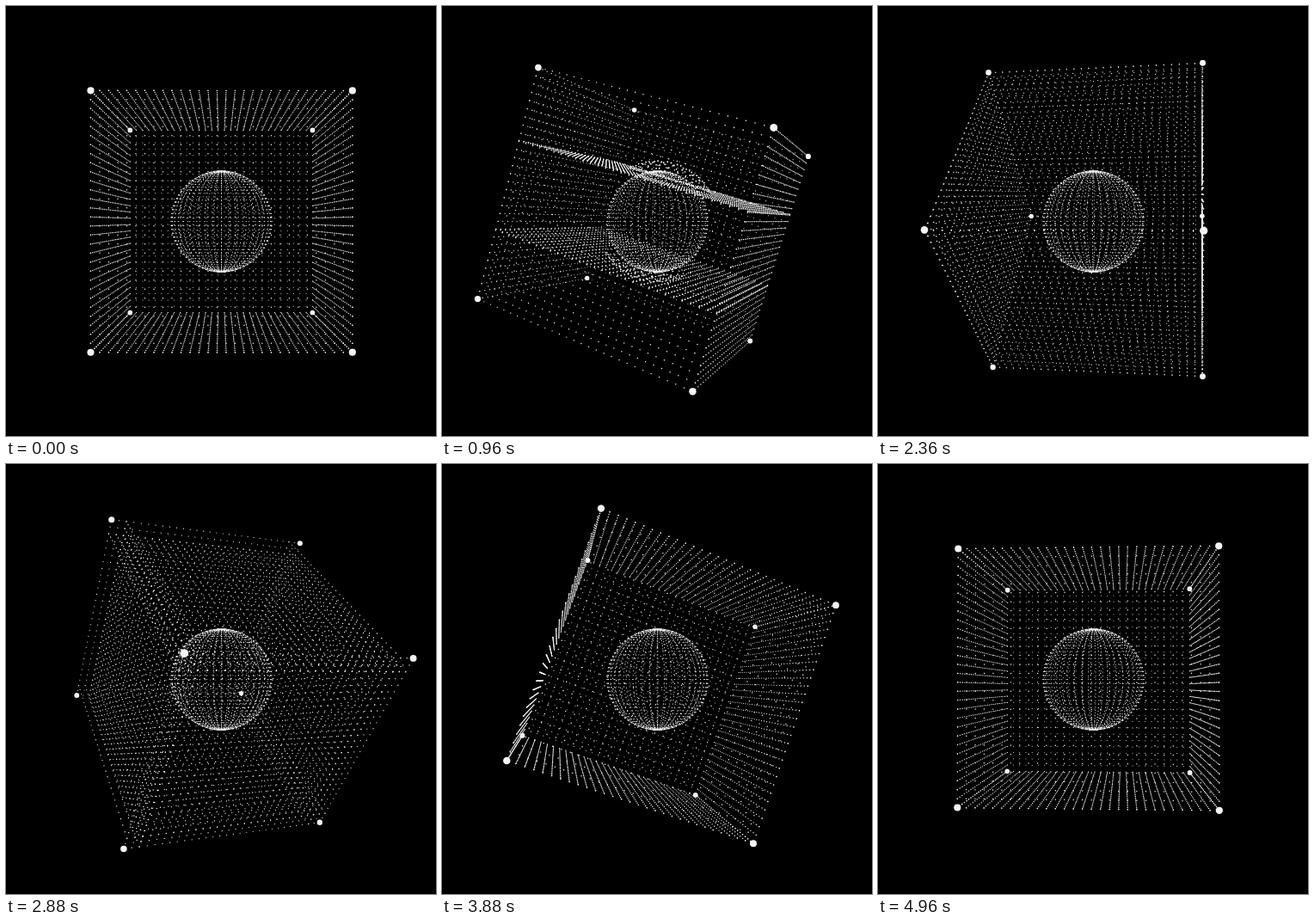
An HTML page with a canvas for the animation above (5 s loop, 500 by 500 pixels).

```html
<!DOCTYPE html>
<html lang="en">
<head>
<meta charset="utf-8">
<title>Dotted cube and sphere</title>
<style>
  html, body { margin: 0; width: 100%; height: 100%; overflow: hidden; background: #000; }
  canvas { display: block; width: 500px; height: 500px; }
</style>
</head>
<body>
<canvas id="stage" width="500" height="500"></canvas>
<script>
const ctx = document.getElementById("stage").getContext("2d");
const TAU = Math.PI * 2;
const LOOP = 5000;
const CENTER = 250.5;
const CAMERA = 700;
const HALF = 125;
const GRID = 30;
const SPHERE = 58.5;
const BUBBLE = 70;
const MERIDIANS = 40;
const PARALLELS = 40;

// Axes whose pair of faces swaps sides in each third of the loop.
const MOVING_AXES = [[1], [0, 2], [0, 1, 2]];

const clamp = (v, lo, hi) => Math.min(hi, Math.max(lo, v));
const easeInOut = p => p < 0.5 ? 4 * p ** 3 : 1 - 4 * (1 - p) ** 3;

const spherePoints = [];
for (let i = 1; i < PARALLELS; i++) {
  const lat = Math.PI * i / PARALLELS;
  for (let j = 0; j < MERIDIANS; j++) {
    const lon = TAU * j / MERIDIANS;
    spherePoints.push([
      SPHERE * Math.sin(lat) * Math.sin(lon),
      SPHERE * Math.cos(lat),
      SPHERE * Math.sin(lat) * Math.cos(lon)
    ]);
  }
}

const gridPos = i => HALF * (2 * i / (GRID - 1) - 1);

function rotateX([x, y, z], angle) {
  const c = Math.cos(angle), s = Math.sin(angle);
  return [x, y * c + z * s, z * c - y * s];
}

function rotateY([x, y, z], angle) {
  const c = Math.cos(angle), s = Math.sin(angle);
  return [x * c + z * s, y, z * c - x * s];
}

function dot([x, y, z], diameter) {
  const scale = CAMERA / (CAMERA - z);
  ctx.beginPath();
  ctx.arc(CENTER + x * scale, CENTER + y * scale, diameter * scale / 2, 0, TAU);
  ctx.fill();
}

// Dots inside the bubble are pushed out onto its surface; dots of faces on the move grow.
function drawFace(axis, offset, place) {
  const restSize = 1.2 + 0.45 * (1 - Math.abs(offset) / HALF);
  for (let i = 0; i < GRID; i++) {
    for (let j = 0; j < GRID; j++) {
      const point = [0, 0, 0];
      point[axis] = offset;
      point[(axis + 1) % 3] = gridPos(i);
      point[(axis + 2) % 3] = gridPos(j);
      const push = Math.max(1, BUBBLE / Math.hypot(...point));
      dot(place(point.map(v => v * push)), restSize + Math.min(0.5, push - 1));
    }
  }
}

function draw(t) {
  const spin = TAU * t;
  const tilt = TAU * t / 4;
  const place = p => rotateY(rotateX(p, tilt), spin);

  ctx.fillStyle = "#000";
  ctx.fillRect(0, 0, 500, 500);
  ctx.fillStyle = "#f5f5f5";

  for (const p of spherePoints) dot(rotateY(p, spin), 1.15);

  const third = Math.floor(t * 3);
  const progress = clamp((t * 3 - third - 0.375) / 0.475, 0, 1);
  const movedOffset = HALF * (1 - 2 * easeInOut(progress));
  for (let axis = 0; axis < 3; axis++) {
    const offset = MOVING_AXES[third].includes(axis) ? movedOffset : HALF;
    drawFace(axis, offset, place);
    drawFace(axis, -offset, place);
  }

  for (const x of [-HALF, HALF])
    for (const y of [-HALF, HALF])
      for (const z of [-HALF, HALF]) dot(place([x, y, z]), 6.7);
}

const start = performance.now();
function frame() {
  draw(((performance.now() - start) % LOOP) / LOOP);
  requestAnimationFrame(frame);
}
frame();
</script>
</body>
</html>
```
